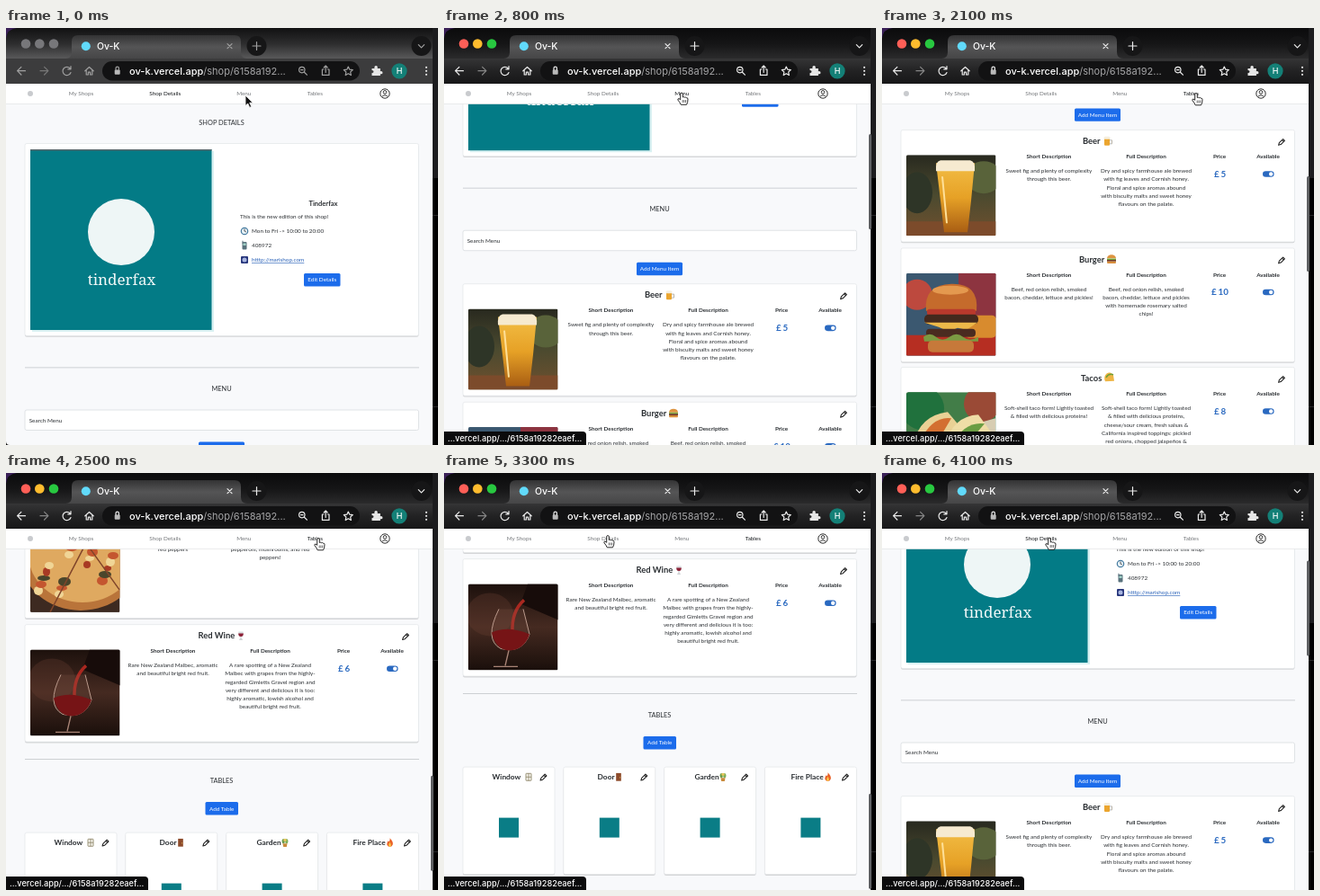
Write an HTML page that moves like this. It is 480 px wide and 464 px high and loops after 4200 ms.

```html
<!DOCTYPE html>
<html lang="en">
<head>
<meta charset="utf-8">
<title>Shop page tour</title>
<style>
html, body { margin: 0; width: 100%; height: 100%; overflow: hidden; background: #000; }
svg { display: block; width: 480px; height: 464px; }
text { font-family: Lato, "Open Sans", sans-serif; font-size: 6.35px; fill: #2b2f33; white-space: pre; }
.mid { text-anchor: middle; }
.bold { font-weight: 700; }
.head { font-size: 7.4px; }
.name { font-size: 9.4px; font-weight: 700; }
.shop { font-size: 7.5px; font-weight: 700; }
.spot { font-size: 8.4px; font-weight: 700; }
.price { font-size: 9.8px; font-weight: 700; fill: #2a69c0; word-spacing: -.6px; }
.white { fill: #fff; }
.link { fill: #2a62b8; text-decoration: underline; }
.brand { font: 17px "Noto Serif", serif; fill: #f2f8f8; }
.nav text { fill: #74777a; }
.nav text.on { fill: #15181b; }
.ui text { font-family: Inter, sans-serif; fill: #fff; font-weight: 500; }
.ui .tab { font-size: 10.4px; }
.ui .url { font-size: 11px; }
.ui .path { fill: #a5a5a7; font-weight: 400; }
.ui .face { font-size: 9px; }
.ui .hint { font-size: 9.2px; }
.ui .line { stroke: #ececec; stroke-width: 1.2; stroke-linecap: round; stroke-linejoin: round; }
.ui .faint { stroke: #858585; }
.ui .strip { fill: url(#strip); }
.ui .bar { fill: url(#bar); }
.blur .line { stroke: #a0a0a0; }
.blur .faint { stroke: #777; }
.blur .lamp { fill: #77777a; }
.blur .strip { fill: url(#dusk); }
.blur .bar { fill: #3c3c3d; }
</style>
</head>
<body>
<svg id="stage" viewBox="0 0 480 464"></svg>
<script>
const LOOP = 4200, STEP = 100;

const rect = (x, y, w, h, fill, r = 0, more = '') =>
  `<rect x="${x}" y="${y}" width="${w}" height="${h}" rx="${r}" fill="${fill}" ${more}/>`;
const circle = (x, y, r, fill, more = '') => `<circle cx="${x}" cy="${y}" r="${r}" fill="${fill}" ${more}/>`;
const oval = (x, y, rx, ry, fill) => `<ellipse cx="${x}" cy="${y}" rx="${rx}" ry="${ry}" fill="${fill}"/>`;
const path = (d, fill, more = '') => `<path d="${d}" fill="${fill}" ${more}/>`;
const stroke = (d, cls = '') => path(d, 'none', `class="line ${cls}"`);
const text = (x, y, s, cls = '') => `<text x="${x}" y="${y}" class="${cls}">${s.replace(/&/g, '&amp;').replace(/>/g, '&gt;')}</text>`;
const at = (x, y, s, more = '') => `<g transform="translate(${x} ${y})" ${more}>${s}</g>`;
const lines = (x, y, list) => list.map((s, i) => text(x, y + i * 9.25, s, 'mid')).join('');
const scatter = (n, draw) => Array.from({ length: n }, (_, i) => draw(i)).join('');
const fade = (id, ...stops) => `<linearGradient id="${id}" x2="0" y2="1">` +
  stops.map((c, i) => `<stop offset="${i / (stops.length - 1)}" stop-color="${c}"/>`).join('') + '</linearGradient>';

const button = (x, y, w, s) => rect(x, y, w, 14.4, '#1c6ceb', 1.5) + text(x + w / 2, y + 9.4, s, 'mid white');
const panel = (x, y, w, h) => rect(x, y + 1.3, w, h, '#00000026', 2) + rect(x, y, w, h, '#fff', 2, 'stroke="#e3e5e8" stroke-width=".7"');
const rule = y => rect(21, y, 438, .8, '#c3c6ca');
const pencil = (x, y) => at(x, y, path('M-3.4 3.4 -2.6.7 1.6-3.4 3.4-1.6-.8 2.6ZM.5-2.3 2.3-.5', 'none', 'stroke="#222" stroke-width="1.1" stroke-linejoin="round"'));

// Small icons, drawn around their centre.
const icons = {
  beer: rect(-4, -3, 6, 8, '#eba52f', 1) + rect(-4.5, -5, 7, 3, '#f5efe0', 1.5) + path('M2-1h2.5v4H2', 'none', 'stroke="#b9b6ae"'),
  burger: path('M-5-1a5 4 0 0 1 10 0Z', '#dd9440') + rect(-5, -.8, 10, 1.6, '#76a63b') + rect(-5, .7, 10, 1.7, '#6b3420') + rect(-5, 2.4, 10, 2.2, '#d98f3c', 1),
  taco: path('M-5 3.5A5 6 0 0 1 4-3.5L5 3Z', '#eeb545') + path('M-4-1Q-1-6 4-4', 'none', 'stroke="#6ca03a" stroke-width="1.6"'),
  fries: path('M-3-5h6v5h-6Z', '#f4c74a') + path('M-4-1h8L3 5h-6Z', '#d33c31'),
  pizza: path('M-5-3Q0-6 5-3L0 5Z', '#efbd50') + circle(-1, -1, 1.2, '#c43a2c') + circle(1.6, -2, 1, '#c43a2c'),
  wine: path('M-2.6-4.5h5.2Q3.4 1 0 1T-2.6-4.5', '#d9dde0') + path('M-2.8-2.5h5.6Q2.8 1 0 1T-2.8-2.5', '#8d2036') + rect(-.4, 1, .8, 3, '#aeb4b8') + rect(-1.8, 3.8, 3.6, .8, '#aeb4b8'),
  window: rect(-3, -4, 6, 8, '#f4f2ea', .5, 'stroke="#857b5c" stroke-width=".8"') + path('M0-4V4M-3 0H3', 'none', 'stroke="#857b5c" stroke-width=".7"'),
  door: rect(-2.8, -4.4, 5.6, 8.8, '#8d4a2a') + circle(1.6, .5, .6, '#e0b455'),
  plant: path('M-2.6 1h5.2L1.8 4.8h-3.6Z', '#c98a3b') + oval(-1.8, -1.6, 1.7, 2.6, '#6d9c4c') + oval(1.8, -1.6, 1.7, 2.6, '#80ad55') + circle(0, -3, 1.6, '#e7c75a'),
  fire: path('M0-5Q4-1 3.3 2A3.4 3.4 0 0 1-3.3 2Q-3.2-.4-1.8-2-1-1-.8-1 .6-3 0-5Z', '#ea6329') + path('M0-.5Q2.6 4 0 4.6-2.6 4 0-.5Z', '#f9cd48')
};
const icon = (name, x, y) => at(x, y, icons[name]);

// Flat stand-ins for the food photos, 99.5 wide.
const photos = {
  beer: h => rect(0, 0, 99.5, h, 'url(#garden)') + oval(12, 42, 17, 23, '#2e3527') + oval(86, 25, 20, 18, '#59633a') + rect(0, 74, 99.5, h - 74, '#7c4b2b') +
    path('M33 9h43l-4 42-4 35H42l-4-35Z', 'url(#ale)') + path('M33 18q-1-11 5-12h33q6 1 5 12Z', '#f6ead0') + path('M40 24l5 52', 'none', 'stroke="#ffe098" stroke-width="2"'),
  burger: h => rect(0, 0, 99.5, h, '#3b5870') + rect(58, 0, 42, 50, '#8d3440') + circle(12, 24, 17, '#bd493e') + rect(0, 69, 99.5, h - 69, '#b62e22') +
    rect(65, 47, 35, 25, '#d88b2e', 5) + path('M22 42Q19 13 50 12T78 42Z', '#c56b2c') + oval(49, 19, 20, 5, '#e4994f') + rect(23, 40, 54, 7, '#b9392c', 3) +
    rect(20, 46, 60, 11, '#44291d', 5) + path('M20 55h59l-12 8-10-2-10 4-11-5Z', '#edb849') + rect(22, 62, 55, 9, '#4a2b20', 4) + path('M19 71q7-6 14 0t15 0 15 0 17 0v5H20Z', '#7b9a42') + rect(24, 75, 51, 13, '#c6793a', 5),
  taco: h => rect(0, 0, 99.5, h, '#427d48') + circle(18, 18, 24, '#20713d') + circle(84, 13, 20, '#9a4a36') + path(`M0 57 99 29V${h}H0Z`, '#d7cdb2') +
    path('M6 77Q6 27 46 22L67 47 35 86Z', '#e9d195') + path('M39 82Q43 27 80 25L99 51 76 89Z', '#efdda6') + path('M15 55Q29 26 50 29L40 46Z', '#d36f31') + path('M51 59Q64 32 87 35L75 49Z', '#6a9d43'),
  fries: h => rect(0, 0, 99.5, h, '#6d4b34') + oval(50, h - 27, 43, 22, '#e7dfcf') + scatter(11, i => rect(18 + i * 6, 23 + i * 17 % 19, 5, 50, '#e7b14a', 1)),
  pizza: h => rect(0, 0, 99.5, h, '#3d2a21') + oval(56, 38, 66, 57, '#b9743a') + oval(58, 33, 60, 53, '#dfa960') +
    scatter(26, i => oval(6 + i * 37 % 91, 4 + i * 29 % 76, 4 + i % 4, 3 + i % 3, ['#a83a24', '#f0d596', '#c4562f', '#4a452b'][i % 4])) +
    path(`M62 20 22 ${h}M62 20 99 72`, 'none', 'stroke="#80452a" stroke-width="1.5"'),
  wine: h => rect(0, 0, 99.5, h, 'url(#cellar)') + oval(24, 34, 26, 24, '#6a40324d') + path('M66 0h34v40L58 22Z', '#170c0a') +
    path('M62 18Q48 30 49 54', 'none', 'stroke="#a92820" stroke-width="3.5"') +
    path('M34 28Q17 62 36 72 60 78 68 56L61 28', '#8a605033', 'stroke="#c7a597" stroke-width=".9"') + path('M26 54Q44 46 68 56 62 74 44 74 30 72 26 54Z', '#761416') +
    path(`M45 74 41 ${h - 5}M28 ${h - 4}h27`, 'none', 'stroke="#a98476" stroke-width="1.4"')
};

const dishes = [
  { id: 'beer', name: 'Beer', y: 484.5, pic: 90, left: 223, mark: 251, price: 5,
    brief: ['Sweet fig and plenty of complexity', 'through this beer.'],
    full: ['Dry and spicy farmhouse ale brewed', 'with fig leaves and Cornish honey.', 'Floral and spice aromas abound', 'with biscuity malts and sweet honey', 'flavours on the palate.'] },
  { id: 'burger', name: 'Burger', y: 616, pic: 92, left: 219, mark: 255, price: 10,
    brief: ['Beef, red onion relish, smoked', 'bacon, cheddar, lettuce and pickles!'],
    full: ['Beef, red onion relish, smoked', 'bacon, cheddar, lettuce and pickles', 'with homemade rosemary salted', 'chips!'] },
  { id: 'taco', name: 'Tacos', y: 748.5, pic: 98, left: 221, mark: 253, price: 8,
    brief: ['Soft-shell taco form! Lightly toasted', '& filled with delicious proteins!'],
    full: ['Soft-shell taco form! Lightly toasted', '& filled with delicious proteins,', 'cheese/sour cream, fresh salsas &', 'California inspired toppings: pickled', 'red onions, chopped jalapeños &', 'cilantro!'] },
  { id: 'fries', name: 'Fries', y: 887, pic: 98, left: 223, mark: 252, price: 4,
    brief: ['Crisp golden fries with sea salt', 'and rosemary.'],
    full: ['Crisp golden fries with sea salt', 'and rosemary, served with a', 'choice of dips.'] },
  { id: 'pizza', name: 'Pizza', y: 1025.5, pic: 97, left: 222, mark: 252, price: 9,
    brief: ['Mozzarella, pepperoni, olives and', 'red peppers'],
    full: ['Stone baked with tomato sauce,', 'pepperoni, mushrooms, and red', 'peppers!'] },
  { id: 'wine', name: 'Red Wine', y: 1164, pic: 96, left: 213.5, mark: 261, price: 6,
    brief: ['Rare New Zealand Malbec, aromatic', 'and beautiful bright red fruit.'],
    full: ['A rare spotting of a New Zealand', 'Malbec with grapes from the highly-', 'regarded Gimletts Gravel region and', 'very different and delicious it is too:', 'highly aromatic, lowish alcohol and', 'beautiful bright red fruit.'] }
];

const dish = d => at(0, d.y,
  panel(21, 0, 437.5, d.pic + 34.5) +
  text(d.left, 15.6, d.name, 'name') + icon(d.id, d.mark, 12.4) + pencil(444, 13.5) +
  [['Short Description', 185.5], ['Full Description', 293.5], ['Price', 375], ['Available', 429]].map(([s, x]) => text(x, 31.6, s, 'mid bold')).join('') +
  lines(185.5, 47.6, d.brief) + lines(293.5, 47.6, d.full) +
  text(375.5, 52.4, '£ ' + d.price, 'mid price') +
  rect(423, 45.8, 12.6, 6.6, '#2a69c0', 3.3) + circle(432.2, 49.1, 2.2, '#fff') +
  at(27, 27.8, photos[d.id](d.pic), `clip-path="url(#pic${d.pic})"`));

const tables = [['Window', 53.5, 94, 'window'], ['Door', 170.5, 194, 'door'], ['Garden', 278.5, 310, 'plant'], ['Fire Place', 385.5, 426.5, 'fire']]
  .map(([s, x, mark, id], i) => {
    const left = 21 + i * 111.8;
    return panel(left, 1395.5, 102, 119.5) + text(x, 1409.5, s, 'spot') + icon(id, mark, 1406.7) +
      pencil(left + 89.5, 1407) + rect(left + 40, 1452, 22, 22, '#0a7d86');
  }).join('');

const shop = panel(21, 128.5, 437.5, 214) +
  rect(29, 137, 202, 201, '#d9f1f2') + rect(27, 135, 201.5, 201, '#037b86') + rect(27, 135, 201.5, 1.5, '#57676b') +
  circle(128, 227, 37, '#eef6f6') + text(128.5, 286, 'tinderfax', 'mid brand') +
  text(352.5, 197.6, 'Tinderfax', 'mid shop') +
  text(260, 212, 'This is the new edition of this shop!') +
  circle(265, 226, 3.7, '#e6f1f7', 'stroke="#447a9f" stroke-width="1.2"') + path('M265 223.6V226l1.8 1', 'none', 'stroke="#333" stroke-width=".8"') +
  text(273, 228.1, 'Mon to Fri -> 10:00 to 20:00') +
  rect(262.5, 238, 5, 8.5, '#58717c', 1) + rect(263.4, 239.5, 3.2, 2.5, '#9fd0c5') + rect(262.5, 236.7, 1, 3, '#58717c') +
  text(273, 244.2, '408972') +
  rect(261, 254, 8, 8, '#27367c', 1) + circle(265, 258, 2.5, '#a9b6e0') +
  text(273, 260.3, 'htttp://marishop.com', 'link') +
  button(331, 273, 40.5, 'Edit Details');

const page = text(239.5, 107.7, 'SHOP DETAILS', 'mid head') + shop + rule(377.5) +
  text(239.5, 404, 'MENU', 'mid head') +
  rect(21, 425, 437.5, 22.5, '#fff', 2, 'stroke="#d9dce0" stroke-width=".8"') + text(25.7, 438.5, 'Search Menu') +
  button(214, 460.5, 51, 'Add Menu Item') + dishes.map(dish).join('') + rule(1313.5) +
  text(239.5, 1340.2, 'TABLES', 'mid head') + button(221.5, 1361.5, 36.5, 'Add Table') + tables;

const links = [['My Shops', 83.5], ['Shop Details', 176.8], ['Menu', 264.3], ['Tables', 343.3]];
const nav = rect(0, 62, 474, 22.5, '#fff') + rect(0, 84.3, 474, .7, '#e2e4e6') + circle(27, 73, 3, '#c9cbce') +
  links.map(([s, x]) => text(x, 75.2, s, 'mid')).join('') +
  circle(421, 73, 5.2, 'none', 'stroke="#333"') + circle(421, 71.4, 1.8, 'none', 'stroke="#333"') + path('M417.4 76.6q3.6-3.6 7.2 0', 'none', 'stroke="#333"');

const lamps = [['#ff5f57', 22], ['#febc2e', 37.3], ['#28c840', 53]];
const browser = rect(0, 0, 474, 35, 'none', 0, 'class="strip"').replace('fill="none"', '') + path('M0 0H12Q1 1 0 12Z', '#3a2057') +
  rect(0, 34, 474, 28, '#222', 0, 'class="bar"') +
  path('M66 34q7 0 7-7V15q0-7 7-7h174q7 0 7 7v12q0 7 7 7Z', 'url(#tab)') +
  lamps.map(([c, x]) => circle(x, 17.5, 5.3, c, 'class="lamp"')).join('') +
  circle(88.8, 20.3, 5, '#61dafb') + text(101, 24, 'Ov-K', 'tab') +
  stroke('M246 17.6l5 5M251 17.6l-5 5') +
  circle(278.5, 20, 11, '#161617') + stroke('M274 20h9M278.5 15.5v9') +
  circle(461.5, 20, 11, '#161617') + stroke('M458.3 18.6l3.2 3.2 3.2-3.2') +
  rect(107, 37, 286, 21.5, '#121213', 10.7) +
  stroke('M21.5 47.7H12.8M16.9 43.4 12.6 47.7l4.3 4.3') + stroke('M38 47.7h8.7M42.600 43.4l4.3 4.3-4.3 4.3', 'faint') +
  stroke('M71.2 45A4.600 4.600 0 1 0 72 49.500M72 42.600v3.2h-3.2') + stroke('M87.800 47.800 92.500 43.500l4.700 4.300M89.200 47v5h2.200v-2.800h2.200V52h2.200v-5') +
  rect(120.7, 46.6, 6, 5.2, '#b9b9b9', 1) + stroke('M122 46.600v-1.800a1.700 1.700 0 0 1 3.400 0v1.800') +
  `<text x="137" y="51.7" class="url">ov-k.vercel.app<tspan class="path">/shop/6158a192...</tspan></text>` +
  stroke('M332 46.6a3.2 3.2 0 1 0-6.4 0a3.2 3.2 0 1 0 6.4 0M331.2 49l3.2 3.2M327.5 46.600h2.600') +
  stroke('M353 46h-1.600v6.400h7.600V46h-1.600M355.200 49.500V42.300M353.200 44l2-2 2 2') +
  stroke('M380.300 43l1.500 3.200 3.500.4-2.600 2.400.7 3.500-3.100-1.800-3.100 1.800.7-3.500-2.600-2.400 3.500-.4Z') +
  path('M406.5 45h3q-.6-3 1.6-3t1.6 3h3.2v3.2q2.6-.5 2.6 1.5t-2.6 1.5V53h-9.4v-3q2 0 2-1.5t-2-1.5Z', '#e6e6e6') +
  circle(437, 47.8, 8.6, '#148077') + text(437, 51, 'H', 'mid face') +
  [43.8, 47.8, 51.8].map(y => circle(467, y, 1.1, '#e6e6e6')).join('');

const arrow = path('M0 0V11.5l2.7-2.4 2 4.3 2-1-2-4.2H8.3Z', '#111', 'stroke="#fff" stroke-width=".8"');
const hand = path('M-1.3.8Q0-.8 1.3.8V5q1-.8 2 .2 1.2-.6 2 .4 1.6-.2 1.7 1.500 0 4-1.500 6.200H-.8Q-2 10.500-4 8.200-4.700 6.700-3 6.500l1.700 1.300Z', '#fff', 'stroke="#111" stroke-width=".9" stroke-linejoin="round"') +
  path('M1.2 8v3M2.9 8v3M4.6 8v3', 'none', 'stroke="#111" stroke-width=".6"');

const clips = [...new Set(dishes.map(d => d.pic))].map(h => `<clipPath id="pic${h}">${rect(0, 0, 99.5, h, '#000', 1.5)}</clipPath>`).join('');
const stage = document.getElementById('stage');
stage.innerHTML = '<defs>' + clips +
  fade('strip', '#0b0b0c', '#151516', '#2c2c2d') + fade('dusk', '#111112', '#2d2d2e', '#5b5b5c') +
  fade('tab', '#333334', '#555556', '#464647') + fade('bar', '#353536', '#222223', '#171718') +
  fade('garden', '#28291f', '#4b4a2f', '#70502e') + fade('ale', '#f2bd45', '#e6a126', '#a95e13') + fade('cellar', '#1d110d', '#452a21', '#1a0f0b') +
  `<clipPath id="view">${rect(0, 62, 474, 402, '#000')}</clipPath></defs>` +
  rect(474, 0, 6, 167, '#1c1c1e') + rect(474, 208, 6, 1, '#252527') + rect(474, 421, 6, 1, '#252527') +
  rect(0, 62, 474, 402, '#f8f9fb') +
  `<g clip-path="url(#view)"><g id="page">${page}</g></g><g class="nav">${nav}</g>` +
  `<g id="thumb">${rect(472, 0, 3, 106, '#5d5f62', 1.5)}</g><g id="ui" class="ui">${browser}</g>` +
  `<g id="bubble" class="ui">${path('M0 449h154q4 0 4 4v11H0Z', '#0b0b0c') + text(4, 460.2, '...vercel.app/.../6158a19282eaef...', 'hint')}</g>` +
  path('M0 460q0 4 4 4H0Z', '#111') +
  `<g id="arrow">${arrow}</g><g id="hand">${hand}</g>`;

const get = id => document.getElementById(id);
const el = Object.fromEntries(['page', 'thumb', 'ui', 'bubble', 'arrow', 'hand'].map(id => [id, get(id)]));
const tabs = [...document.querySelectorAll('.nav text')];
const move = (node, x, y) => node.setAttribute('transform', `translate(${x} ${y})`);
const show = (node, on) => node.setAttribute('visibility', on ? 'visible' : 'hidden');

// Each click: start time, scroll from, scroll to, active link.
const END = 1068.4;
const clicks = [[381, 0, 299, 2], [1947, 299, END, 3], [3564, END, 0, 1]];
const GLIDE = 707;
const ease = x => x < .5 ? 2 * x * x : 1 - 2 * (1 - x) ** 2;
const pointer = [[0, 266, 75], [300, 265, 73], [800, 264, 72], [1150, 265, 72], [1500, 347, 74.5], [2100, 349, 72.5], [2500, 347, 72.5], [2800, 346, 72.5], [3300, 182, 69.5], [3600, 186, 72], [4200, 186, 72]];

function pointerAt(t) {
  const i = pointer.findIndex(p => p[0] > t), [t0, x0, y0] = pointer[i - 1], [t1, x1, y1] = pointer[i];
  const k = (t - t0) / (t1 - t0);
  return [x0 + (x1 - x0) * k, y0 + (y1 - y0) * k];
}

function draw(t) {
  let scroll = 0, active = 1;
  for (const [start, from, to, link] of clicks) {
    if (t < start) break;
    scroll = from + (to - from) * ease(Math.min(1, (t - start) / GLIDE));
    active = link;
  }
  const focused = t >= 300;
  move(el.page, 0, -scroll);
  move(el.thumb, 0, 63 + scroll * .275);
  tabs.forEach((node, i) => node.classList.toggle('on', i === active));
  el.ui.classList.toggle('blur', !focused);
  show(el.thumb, t >= 400);
  show(el.bubble, t >= 400);
  show(el.arrow, !focused);
  show(el.hand, focused);
  const [x, y] = pointerAt(t);
  move(el.arrow, x, y);
  move(el.hand, x, y);
}

const begin = performance.now();
function tick() {
  const t = (performance.now() - begin) % LOOP;
  draw(Math.floor(t / STEP) * STEP);
  requestAnimationFrame(tick);
}
tick();
</script>
</body>
</html>
```
